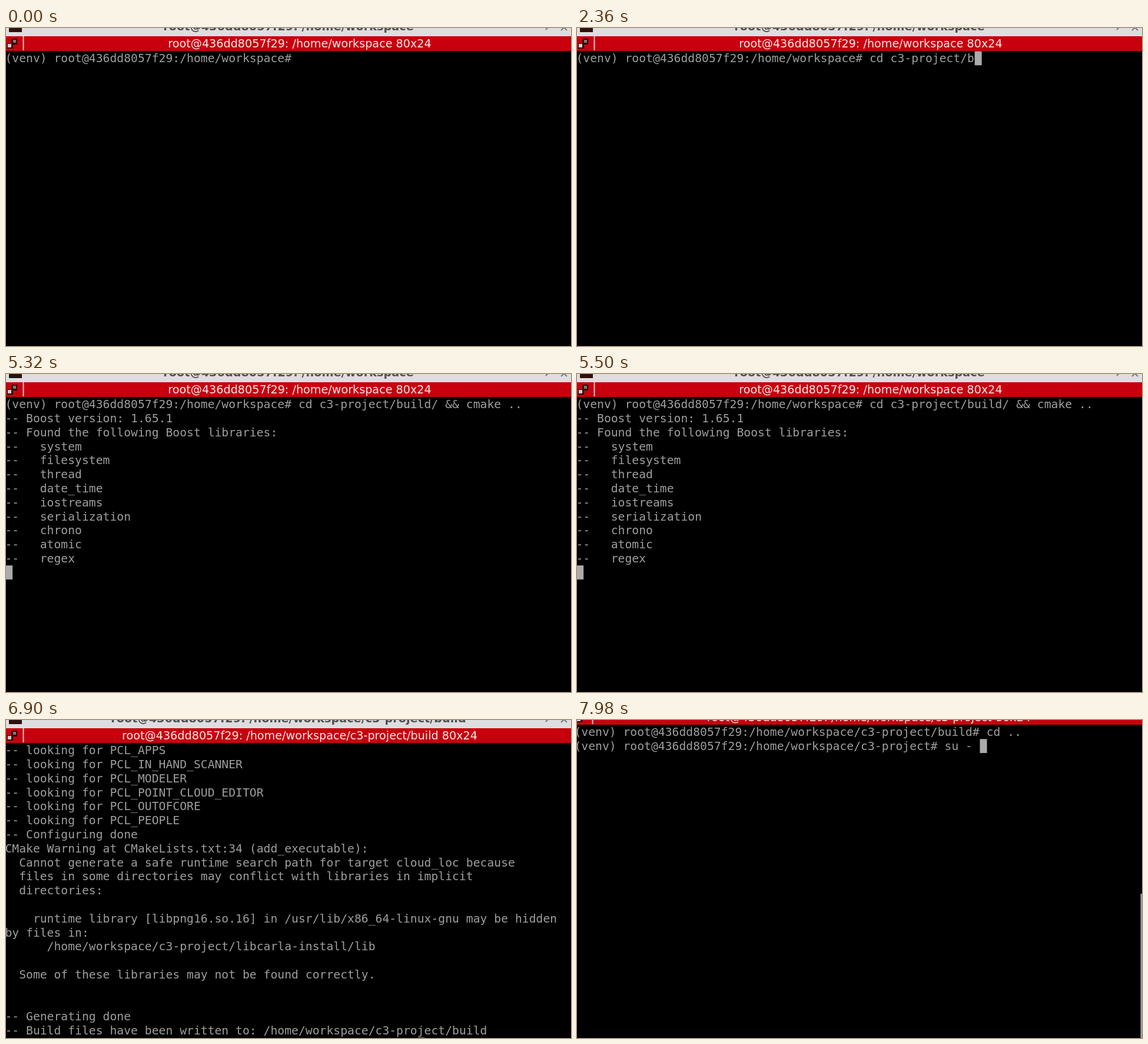
An HTML page with a canvas for the animation above (8 s loop, 960 by 540 pixels).

```html
<!DOCTYPE html>
<html>
<head>
<meta charset="utf-8">
<style>
html, body { margin: 0; width: 100%; height: 100%; overflow: hidden; background: #000; }
canvas { display: block; filter: blur(0.6px); }
</style>
</head>
<body>
<canvas width="960" height="540"></canvas>
<script>
const ctx = document.querySelector('canvas').getContext('2d');
const LOOP = 8000, CELL = 11.87, ROW = 23.8, TOP = 39.5, ROWS = 22;
const INK = '#9d9d9d', CURSOR = '#ababab', BAR = '#dedee0', RED = '#c8000e';
const HOST = 'root@436dd8057f29', HOME = '/home/workspace', PROJECT = HOME + '/c3-project', BUILD = PROJECT + '/build';
const prompt = dir => `(venv) ${HOST}:${dir}# `;

// Keystrokes: [time, text added]
const buildKeys = [[480, 'c'], [680, 'd'], [960, ' '], [1400, 'c'], [1680, '3'], [1980, '-project/'], [2260, 'b'],
  [2560, 'u'], [3240, 'ild/'], [3560, ' '], [3740, '&'], [4060, '&'], [4180, ' '], [4280, 'c'], [4380, 'm'],
  [4460, 'a'], [4540, 'k'], [4640, 'e'], [4920, ' ..']];
const upKeys = [[7080, 'c'], [7140, 'd'], [7200, ' '], [7260, '.'], [7320, '.']];
const suKeys = [[7580, 's'], [7680, 'u'], [7780, ' '], [7860, '-'], [7940, ' ']];

const boost = ['system', 'filesystem', 'thread', 'date_time', 'iostreams', 'serialization', 'chrono', 'atomic', 'regex'];
const pcl = ['COMMON', 'KDTREE', 'OCTREE', 'SEARCH', 'SAMPLE_CONSENSUS', 'FILTERS', '2D', 'GEOMETRY', 'IO', 'FEATURES',
  'ML', 'SEGMENTATION', 'VISUALIZATION', 'SURFACE', 'REGISTRATION', 'KEYPOINTS', 'TRACKING', 'RECOGNITION', 'STEREO',
  'APPS', 'IN_HAND_SCANNER', 'MODELER', 'POINT_CLOUD_EDITOR', 'OUTOFCORE', 'PEOPLE'];
const output = [
  '-- Boost version: 1.65.1',
  '-- Found the following Boost libraries:',
  ...boost.map(name => '--   ' + name),
  ...pcl.map(name => '-- looking for PCL_' + name),
  '-- Configuring done',
  'CMake Warning at CMakeLists.txt:34 (add_executable):',
  '  Cannot generate a safe runtime search path for target cloud_loc because',
  '  files in some directories may conflict with libraries in implicit',
  '  directories:',
  '',
  '    runtime library [libpng16.so.16] in /usr/lib/x86_64-linux-gnu may be hidden',
  'by files in:',
  '      /home/workspace/c3-project/libcarla-install/lib',
  '',
  '  Some of these libraries may not be found correctly.',
  '', '',
  '-- Generating done',
  '-- Build files have been written to: ' + BUILD
];

const clamp = v => Math.max(0, Math.min(1, v));
const typed = (keys, t) => keys.filter(k => k[0] <= t).map(k => k[1]).join('');

function box(color, x, y, w, h) {
  ctx.fillStyle = color;
  ctx.fillRect(x, y, w, h);
}

function label(text, x, y, color, font) {
  ctx.fillStyle = color;
  ctx.font = font + ' "DejaVu Sans", sans-serif';
  ctx.textAlign = 'center';
  ctx.fillText(text, x, y);
}

// Terminal contents at time t; the cursor follows the last line
function screen(t) {
  if (t >= 7000) {
    const lines = [prompt(BUILD) + typed(upKeys, t)];
    if (t >= 7400) lines.push(prompt(PROJECT) + typed(suKeys, t));
    return lines;
  }
  const lines = [prompt(HOME) + typed(buildKeys, t)];
  if (t < 5080) return lines;
  const first = 2 + boost.length;
  const shown = t < 5180 ? 0 : t < 5500 ? first
    : first + Math.floor((output.length - first) * clamp((t - 5500) / 380));
  lines.push(...output.slice(0, shown), t < 5900 ? '' : prompt(BUILD));
  return lines.slice(-ROWS);
}

function drawTerminal(lines, cursorOn) {
  ctx.font = '19.72px "DejaVu Sans Mono", monospace';
  ctx.textAlign = 'left';
  ctx.fillStyle = INK;
  lines.forEach((line, row) => {
    [...line].forEach((ch, col) => ctx.fillText(ch, col * CELL - 1.6, TOP + row * ROW + 18.6));
  });
  const last = lines.length - 1;
  if (cursorOn) box(CURSOR, lines[last].length * CELL - 0.9, TOP + last * ROW, 12, ROW);
}

function drawBars(dir) {
  box(BAR, 0, -40, 1000, 54);
  label(`${HOST}: ${dir}`, 480, 4, '#505050', 'bold 19.25px');
  box('#30100e', 5, -14, 22, 21);
  ctx.strokeStyle = '#777';
  ctx.lineWidth = 2;
  ctx.beginPath();
  ctx.moveTo(917, 3); ctx.lineTo(921, -1);
  ctx.moveTo(943, 4); ctx.lineTo(953, -6);
  ctx.moveTo(953, 4); ctx.lineTo(943, -6);
  ctx.stroke();

  box(RED, 0, 14, 1000, 25);
  box('#2a0808', 9, 18, 10, 10);
  box('#2a0808', 2, 26, 10, 9);
  box('#cfcfcf', 3, 27, 6, 6);
  box('#8a7474', 12, 20, 5, 5);
  box('#eec4c4', 28.5, 14, 2, 24);
  label(`${HOST}: ${dir} 80x24`, 499, 33, '#ffe8e8', '19.2px');
}

// Ripple around the pointer below the visible area
function drawRipple(t) {
  if (t < 6060 || t > 6320) return;
  const grow = (t - 6160) * 0.04;
  ctx.globalAlpha = 1 - clamp((t - 6220) / 100);
  ctx.strokeStyle = '#c4c4c4';
  ctx.fillStyle = '#000';
  [[51, 3.5], [43, 3]].forEach(([radius, width]) => {
    ctx.lineWidth = width;
    ctx.beginPath();
    ctx.arc(350, 574, radius + grow, 0, Math.PI * 2);
    ctx.fill();
    ctx.stroke();
  });
  ctx.globalAlpha = 1;
}

function frame(now) {
  const t = now % LOOP;
  const p = clamp((t - 7000) / 260), pan = p * p * (3 - 2 * p);
  const dir = t < 5900 ? HOME : t < 7400 ? BUILD : PROJECT;
  box('#000', 0, 0, 960, 540);
  ctx.save();
  ctx.translate(-3 * pan, -31 * pan);
  drawTerminal(screen(t), t >= 100);
  drawBars(dir);
  if (t >= 7000) box('#9c9c9c', 960.5, 326, 12, 300);
  ctx.restore();
  drawRipple(t);
  requestAnimationFrame(frame);
}
requestAnimationFrame(frame);
</script>
</body>
</html>
```
